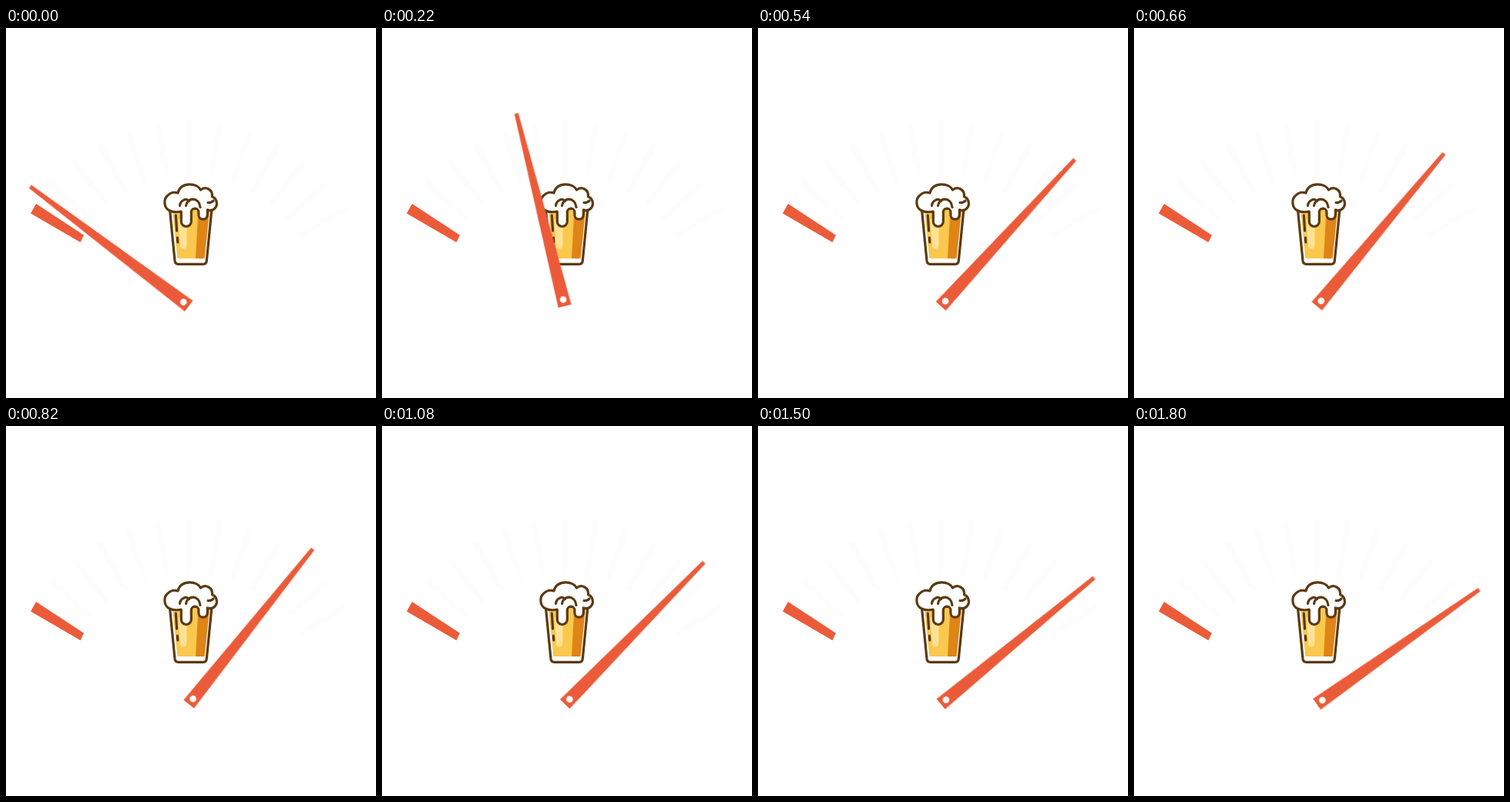
An HTML page that plays this animation: 480x480 px, repeating every 2400 ms.

```html
<!DOCTYPE html>
<html lang="en">
<head>
<meta charset="utf-8">
<title>Beer gauge</title>
<style>
  html, body { margin: 0; width: 100%; height: 100%; overflow: hidden; background: #fff; }
  svg { display: block; width: 100%; height: 100%; }
  .red { fill: #ec5b39; }
  .line { stroke: #5b3a12; stroke-width: 3.2; stroke-linecap: round; stroke-linejoin: round; }
  .open { fill: none; }

  /* Sweep up, bounce back, then creep to the end; 20 ms per step. */
  .needle { animation: sweep 2400ms infinite; }
  @keyframes sweep {
    0%   { transform: rotate(-53deg);  animation-timing-function: steps(30); }
    25%  { transform: rotate(53deg);   animation-timing-function: steps(6); }
    30%  { transform: rotate(26.6deg); animation-timing-function: steps(6); }
    35%  { transform: rotate(41deg);   animation-timing-function: steps(48); }
    75%, 100% { transform: rotate(54.8deg); }
  }
</style>
</head>
<body>
<svg viewBox="0 0 480 480">
  <!-- gauge marks -->
  <path d="M-154.4-133.3A204 204 0 0 1 174.7-105.4" transform="translate(237.2 360.8)"
        fill="none" stroke="#fdfdfd" stroke-width="72" pathLength="108.15" stroke-dasharray="2 7.65"/>
  <path class="red" d="M39 228L101 268.8L96.5 278L32 240.5Z"/>

  <!-- glass -->
  <path class="line" fill="#fff" d="M212.5 236L219 302Q219.6 306.3 223.5 306.3H256Q259.8 306.3 260.3 302L266.8 236Z"/>
  <path fill="#f9c84d" d="M216 236H263.5L257.3 299H222.4Z"/>
  <path fill="#df8417" d="M249.5 236H264.2L257.6 299H246Z"/>
  <path fill="#fde196" d="M223.5 248H234.5V282A4.3 4.3 0 0 1 226 283Z"/>
  <path class="line open" d="M220.3 243L221.6 263M222.4 272L222.8 278"/>

  <!-- foam -->
  <path class="line" fill="#fff" d="M212.5 237C204.5 233.5 204 222.5 209.5 217.5
    C213 213.5 218.500 212.300 223 214C224.500 206.500 231 202.800 238 202.800
    C245 202.800 250.500 206 252.500 210C259 204.800 268.500 209.500 267.500 219
    C273.500 220.500 275.300 229.500 271 233.800C268.500 236.500 264.500 237 261.300 236
    V242.500A5.700 5.700 0 0 1 249.900 242.500V239A4.800 4.800 0 0 0 240.300 239
    V251A6.500 6.500 0 0 1 227.300 251V238C223 239 217 239 212.500 237Z"/>
  <path class="line open" d="M225.500 230.500C226 224 233.500 220 237.500 224.500M233.500 230.500C235.500 219 250.500 219 252 232.500M262 226.500Q266.500 227 269 224"/>

  <g transform="translate(237.2 360.8)">
    <g class="needle">
      <path class="red" d="M-2.6-257.7H2.6L8.7 0H-8.7Z"/>
      <circle cy="-8.700" r="4.300" fill="#fff"/>
    </g>
  </g>
</svg>
</body>
</html>
```
